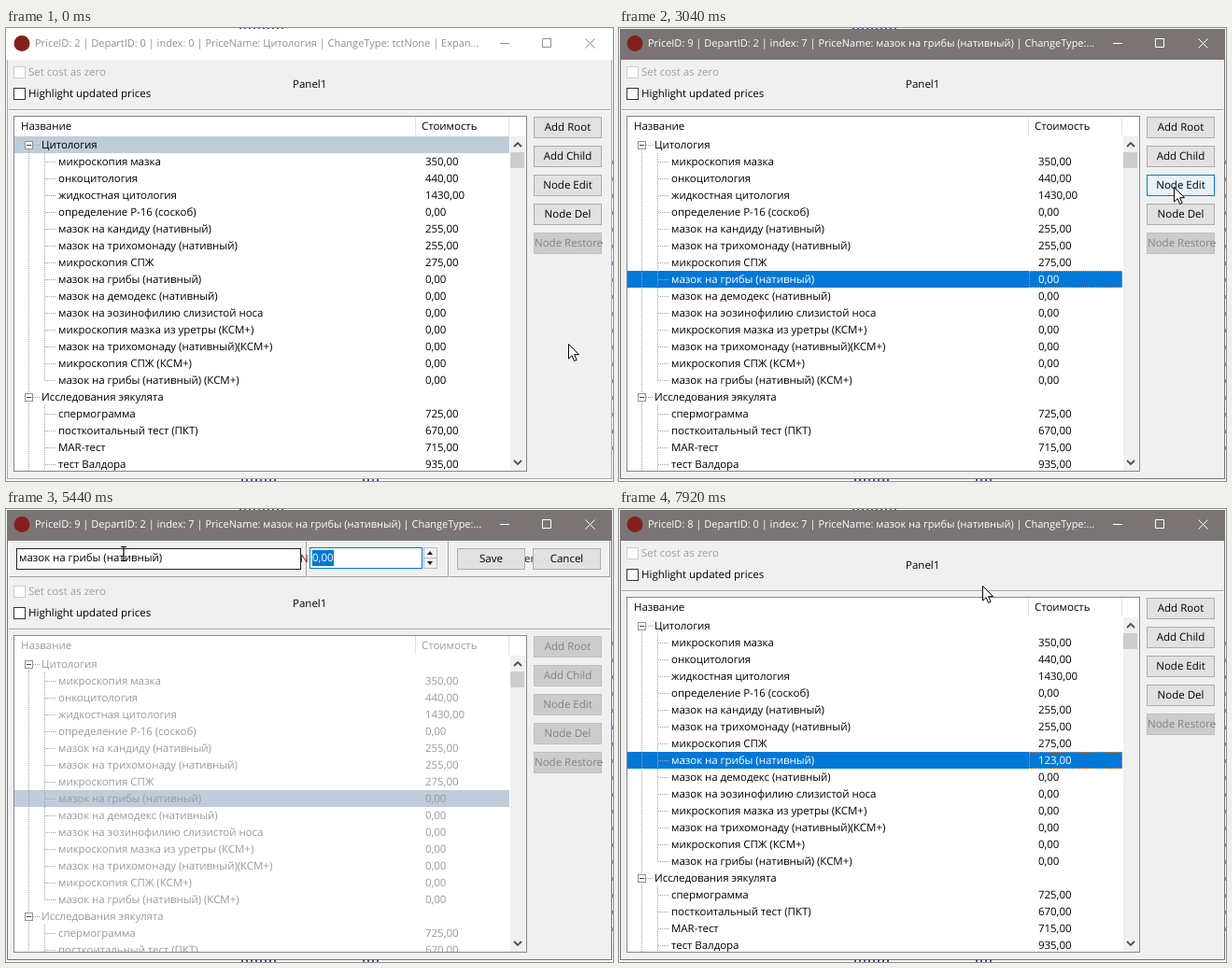
Write an HTML page that moves like this. It is 650 px wide and 485 px high and loops after 8 s.

```html
<!DOCTYPE html>
<html lang="ru">
<head>
<meta charset="utf-8">
<title>Price editor</title>
<style>
html, body { margin: 0; width: 100%; height: 100%; overflow: hidden; background: #fff; }
#stage {
  position: relative; width: 650px; height: 485px; overflow: hidden; background: #f7f7f7;
  font: 11.5px "Open Sans", "Noto Sans", sans-serif; color: #000;
  text-rendering: geometricPrecision; white-space: pre;
  animation: theme 8s step-end infinite;
}
#stage div { position: absolute; box-sizing: border-box; }
@keyframes theme {
  0%   { --bar: #fff; --bar-ink: #8f8f8f; --edge: #aaa; --ink: #000; --shift: 0px; }
  8%   { --bar: #7a7574; --bar-ink: #fff; --edge: #7a7574; --ink: #000; --shift: 0px; }
  42%  { --bar: #7a7574; --bar-ink: #fff; --edge: #7a7574; --ink: #9b9b9b; --shift: 41px; }
  92%, 100% { --bar: #7a7574; --bar-ink: #fff; --edge: #7a7574; --ink: #000; --shift: 0px; }
}
.behind { background: repeating-linear-gradient(90deg, #4a4a9a 0 2px, #fff 2px 5px); }
.behind.side { background: repeating-linear-gradient(#8c8cc8 0 4px, #fff 4px 18px); }
#window { left: 1px; top: 1px; width: 648px; height: 482px; background: #f0f0f0; border: 1px solid var(--edge); }
#bar { left: 1px; top: 1px; width: 648px; height: 33px; background: var(--bar); color: var(--bar-ink); }
#bar svg { position: absolute; left: 0; top: 0; fill: none; stroke: var(--bar-ink); }
.title { left: 30px; top: 7px; line-height: 18px; font-size: 11px; }
#form { left: 0; top: var(--shift); width: 650px; height: 485px; }
#panel { left: 0; top: 0; width: 650px; height: 80px; }
.label { line-height: 18px; }
.check { width: 13px; height: 13px; background: #fff; border: 1px solid #333; }
.dim { color: #a0a0a0; border-color: #ccc; }
.rule { height: 2px; background: linear-gradient(#a0a0a0 50%, #fff 50%); }
#tree {
  left: 8px; top: calc(94px + var(--shift)); width: 550px; height: calc(381px - var(--shift));
  background: #fff; border: 1px solid #828790; overflow: hidden; color: var(--ink);
}
.cell { line-height: 20px; letter-spacing: -.04px; }
.sep { background: #e2e2e2; }
.pick { left: 0; width: 530px; height: 18px; background: #0078d7; color: #fff; }
.pick.still { background: #bfcddb; color: var(--ink); }
.focus { border: 1px dotted #ff8728; }
.dots-x { height: 1px; background: repeating-linear-gradient(90deg, #a0a0a0 0 1px, transparent 1px 2px); }
.dots-y { width: 1px; background: repeating-linear-gradient(#a0a0a0 0 1px, transparent 1px 2px); }
.fold { width: 9px; height: 9px; border: 1px solid #919191; background: linear-gradient(#444, #444) 1px 3px / 5px 1px no-repeat #fff; }
#scroll { left: 531px; top: 21px; width: 16px; bottom: 0; background: #f0f0f0; }
#scroll svg { position: absolute; left: 0; fill: none; stroke: #505050; stroke-width: 1.8; }
.btn { width: 73px; height: 23px; line-height: 21px; text-align: center; background: #e1e1e1; border: 1px solid #adadad; }
.btn.hover { background: #e5f1fb; border-color: #0078d7; }
.btn.off { background: #ccc; border-color: #bfbfbf; color: #838383; }
.bevel { border: 1px solid; border-color: #fff #a0a0a0 #a0a0a0 #fff; }
.edit { background: #fff; border: 1px solid #222; line-height: 20px; padding-left: 2px; }
.edit.active { border-color: #0078d7; }
.blank { background: #fff; border: 1px solid #d8d8d8; }
.marked { background: #0078d7; color: #fff; line-height: 17px; }
.spin { width: 15px; height: 12px; background: #f0f0f0; border: 1px solid #bbb; }
.spin::after { content: ""; position: absolute; left: 3px; top: 3px; border: 3.5px solid transparent; border-top: 0; border-bottom: 4px solid #222; }
.spin.down { transform: scaleY(-1); }
#cursor { left: 0; top: 0; width: 1px; height: 1px; animation: travel 8s ease-in-out infinite; }
#cursor svg { position: absolute; left: 0; top: 0; overflow: visible; }
@keyframes travel {
  0% { transform: translate(602px, 338px); animation-timing-function: step-end; }
  1.5% { transform: translate(602px, 337px); animation-timing-function: step-end; }
  6%, 9% { transform: translate(602px, 336px); }
  15.5%, 18% { transform: translate(441px, 266px); }
  26%, 28.5% { transform: translate(594px, 149px); }
  33%, 34.5% { transform: translate(596px, 191px); }
  38%, 45% { transform: translate(594px, 170px); }
  52% { transform: translate(430px, 57px); }
  56%, 58% { transform: translate(297px, 53px); }
  62.5%, 68% { transform: translate(126px, 48px); }
  72%, 82% { transform: translate(123px, 47px); }
  85% { transform: translate(300px, 68px); }
  88% { transform: translate(536px, 67px); }
  90%, 92.5% { transform: translate(532px, 56px); }
  98.5%, 100% { transform: translate(389px, 82px); }
}
</style>
</head>
<body>
<div id="stage">
  <div class="behind" style="left:250px;top:0;width:48px;height:1px"></div>
  <div class="behind" style="left:252px;top:483px;width:38px;height:2px"></div>
  <div class="behind" style="left:382px;top:483px;width:20px;height:2px"></div>
  <div class="behind side" style="left:649px;top:142px;width:1px;height:320px"></div>
  <div id="window"></div>
  <div id="bar">
    <svg width="648" height="33">
      <circle cx="16" cy="15.5" r="8.5" fill="#84201c" stroke="none"/>
      <path d="M528 15.5h10M573.5 10.5h9v9h-9zM619.5 10.5l10 10m0-10l-10 10"/>
    </svg>
    <div class="title" data-on="0-1320">PriceID: 2 | DepartID: 0 | index: 0 | PriceName: Цитология | ChangeType: tctNone | Expan...</div>
    <div class="title" data-on="1320-7360">PriceID: 9 | DepartID: 2 | index: 7 | PriceName: мазок на грибы (нативный) | ChangeType:...</div>
    <div class="title" data-on="7360-8000">PriceID: 8 | DepartID: 0 | index: 7 | PriceName: мазок на грибы (нативный) | ChangeType:...</div>
  </div>
  <div id="form">
    <div class="check dim" style="left:8px;top:41px"></div>
    <div class="label dim" style="left:24px;top:39px">Set cost as zero</div>
    <div class="check" style="left:8px;top:64px"></div>
    <div class="label" style="left:24px;top:62px">Highlight updated prices</div>
    <div class="label" style="left:307px;top:52px">Panel1</div>
    <div class="rule" style="left:3px;top:87px;width:644px"></div>
  </div>
  <div id="tree"></div>
  <div id="panel" data-on="3360-7360"></div>
  <div id="cursor">
    <svg width="1" height="1">
      <circle cy="-1" r="12" fill="#ffff50" fill-opacity=".85" data-on="640-760 1280-1480 3080-3360 4480-4640 7240-7360"/>
      <path d="M.5.5v15.6l3.6-3.5 2.5 5.9 2.5-1.1-2.5-5.7h4.9z" fill="#fff" stroke="#000" data-on="0-4160 6720-8000"/>
      <path d="M-3 -7.5h2.5l.5 .5 .5-.5h2.5M0-7v14M-3 7.5h2.5l.5-.5 .5 .5h2.5" fill="none" stroke="#000" stroke-width="1.2" data-on="4160-6720"/>
    </svg>
  </div>
</div>
<script>
const LOOP = 8000;
const $ = id => document.getElementById(id);
const stage = $('stage'), tree = $('tree'), panel = $('panel'), form = $('form');

function add(parent, cls, [left, top, width, height], text = '', on) {
  const el = document.createElement('div');
  el.className = cls;
  const px = { left, top, width, height };
  for (const key in px) if (px[key] !== undefined) el.style[key] = px[key] + 'px';
  el.textContent = text;
  if (on) el.dataset.on = on;
  parent.append(el);
  return el;
}

const rows = [
  ['Цитология'], ['микроскопия мазка', 350], ['онкоцитология', 440], ['жидкостная цитология', 1430],
  ['определение Р-16 (соскоб)', 0], ['мазок на кандиду (нативный)', 255],
  ['мазок на трихомонаду (нативный)', 255], ['микроскопия СПЖ', 275],
  ['мазок на грибы (нативный)', 0], ['мазок на демодекс (нативный)', 0],
  ['мазок на эозинофилию слизистой носа', 0], ['микроскопия мазка из уретры (КСМ+)', 0],
  ['мазок на трихомонаду (нативный)(КСМ+)', 0], ['микроскопия СПЖ (КСМ+)', 0],
  ['мазок на грибы (нативный) (КСМ+)', 0], ['Исследования эякулята'],
  ['спермограмма', 725], ['посткоитальный тест (ПКТ)', 670], ['MAR-тест', 715], ['тест Валдора', 935]
];
const rowTop = i => 21 + 18 * i;
const isRoot = i => rows[i][1] === undefined;

function cells(parent, i, top, cost = rows[i][1]) {
  add(parent, 'cell', [isRoot(i) ? 29 : 47, top], rows[i][0]);
  if (cost !== undefined) add(parent, 'cell', [440, top], cost + ',00');
}
function pick(i, on, { still = false, cost, focus } = {}) {
  const el = add(tree, still ? 'pick still' : 'pick', [0, rowTop(i)], '', on);
  cells(el, i, 0, cost);
  if (focus) add(el, 'focus', [focus[0], 0, focus[1], 18]);
}

add(tree, 'cell', [7, 1], 'Название');
add(tree, 'cell', [436, 1], 'Стоимость');
for (const x of [429, 529]) add(tree, 'sep', [x, 0, 1, 20]);
rows.forEach((row, i) => cells(tree, i, rowTop(i)));
const costFocus = [430, 100];
pick(0, '0-640', { still: true });
pick(0, '640-1320', { focus: [1, 429] });
pick(8, '1320-3360', { focus: costFocus });
pick(8, '3360-7360', { still: true });
pick(8, '7360-8000', { cost: 123, focus: costFocus });
rows.forEach((row, i) => {
  const mid = rowTop(i) + 9;
  add(tree, 'dots-x', isRoot(i) ? [20, mid, 7] : [33, mid, 12]);
  if (isRoot(i)) add(tree, 'fold', [11, mid - 4]);
});
add(tree, 'dots-y', [15, 36, 1, 260]);
add(tree, 'dots-y', [32, 39, 1, 244]);
add(tree, 'dots-y', [32, 309, 1, 80]);
add(tree, 'dots-y', [15, 306, 1, 80]);

const scroll = add(tree, '', []);
scroll.id = 'scroll';
scroll.innerHTML = '<svg style="top:0" width="16" height="17"><path d="M4 11l4-4 4 4"/></svg>' +
  '<svg style="bottom:0" width="16" height="17"><path d="M4 6l4 4 4-4"/></svg>';
add(scroll, '', [0, 17, 15, 17]).style.background = '#cdcdcd';

function button(parent, label, x, y, hover, off) {
  add(parent, 'btn', [x, y], label);
  if (hover) add(parent, 'btn hover', [x, y], label, hover);
  if (off) add(parent, 'btn off', [x, y], label, off);
}
[
  ['Add Root', '', '3560-7360'],
  ['Add Child', '1960-2400', '3560-7360'],
  ['Node Edit', '2400-2560 2840-3360', '3360-7360'],
  ['Node Del', '2560-2840', '3560-7360'],
  ['Node Restore', '', '0-8000']
].forEach(([label, hover, off], i) => button(form, label, 565, 95 + 31 * i, hover, off));

add(panel, 'bevel', [3, 34, 319, 39]);
add(panel, 'bevel', [322, 34, 152, 39]);
add(panel, 'bevel', [474, 34, 173, 39]);
add(panel, 'label', [315, 45], 'N').style.color = '#8b1a1a';
add(panel, 'edit', [11, 42, 305, 23], rows[8][0]).style.letterSpacing = '-.04px';
for (const [x, w] of [[446, 17], [481, 37], [527, 30], [562, 76]])
  add(panel, 'blank', [x, 41, w, 24], '', '3360-3560');
const costBox = [325, 41, 121, 23];
add(panel, 'edit', costBox);

const editor = add(panel, '', [0, 0, 650, 80], '', '3560-7360');
add(editor, 'edit active', costBox, '', '3560-4640 5280-7360');
add(editor, 'label', [555, 45], 'er').style.color = '#20205a';
add(editor, 'spin', [447, 41]);
add(editor, 'spin down', [447, 52]);
button(editor, 'Save', 483, 42, '7080-7360');
button(editor, 'Cancel', 564, 42);
add(editor, 'marked', [328, 44, 23, 17], '0,00', '3560-4640 5440-5520');
[['0,00', '4640-5440'], ['1', '5520-5600'], ['12', '5600-5680'], ['123', '5680-7360']]
  .forEach(([text, on]) => add(editor, 'label', [328, 43], text, on));

// Each data-on span "from-to" (ms) makes its element visible for that part of the loop.
for (const el of stage.querySelectorAll('[data-on]')) {
  const frames = [];
  const mark = (ms, opacity) => frames.push({ offset: ms / LOOP, opacity, easing: 'step-end' });
  const spans = el.dataset.on.split(' ').map(span => span.split('-').map(Number));
  if (spans[0][0] > 0) mark(0, 0);
  for (const [from, to] of spans) {
    mark(from, 1);
    mark(to, to < LOOP ? 0 : 1);
  }
  if (spans.at(-1)[1] < LOOP) mark(LOOP, 0);
  el.animate(frames, { duration: LOOP, iterations: Infinity });
}
</script>
</body>
</html>
```
